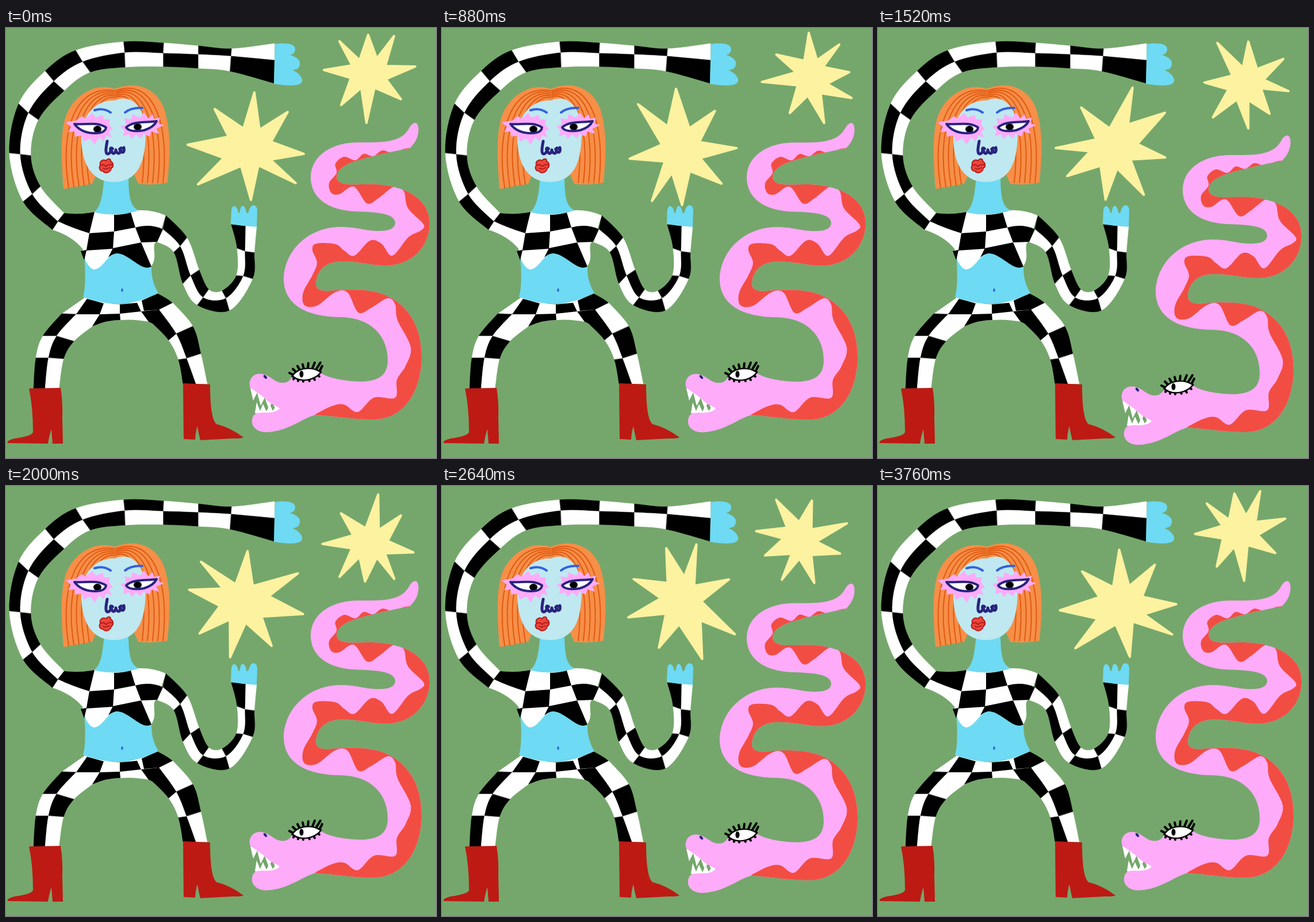
Write an HTML page with a canvas that moves like this. It is 748 px wide and 748 px high and loops after 3.84 s.

```html
<!DOCTYPE html>
<html lang="en">
<head>
<meta charset="utf-8">
<title>Dancer, stars and snake</title>
<style>
html, body { margin: 0; width: 100%; height: 100%; overflow: hidden; background: #75a76c; }
canvas { display: block; }
</style>
</head>
<body>
<canvas id="stage" width="748" height="748"></canvas>
<script>
const ctx = document.getElementById('stage').getContext('2d');
const FRAME = 80, FRAMES = 48, BOUNCE = 12;
const GREEN = '#75a76c', STAR = '#fcf2a0', SKY = '#6edaf3', FACE = '#bfe8f0', PINK = '#feabf9',
  RED = '#f24d43', BOOT = '#bd1a14', NAVY = '#29237f', HAIR = '#f68f48', STREAK = '#e25a12';

const fill = (d, color) => { ctx.fillStyle = color; ctx.fill(new Path2D(d)); };
const line = (d, color, width) => {
  ctx.strokeStyle = color;
  ctx.lineWidth = width;
  ctx.stroke(new Path2D(d));
};
const dot = (x, y, rx, ry, color, tilt = 0) => {
  ctx.fillStyle = color;
  ctx.beginPath();
  ctx.ellipse(x, y, rx, ry, tilt, 0, 7);
  ctx.fill();
};
const pairs = list => list.reduce((out, v, i) => (i % 2 ? out[out.length - 1].push(v) : out.push([v]), out), []);

// Controls of the smooth segment from point i to i + 1.
function segment(pts, i) {
  const b = pts[i], c = pts[i + 1], a = pts[i - 1] || b, d = pts[i + 2] || c;
  return [b, b.map((v, k) => v + (c[k] - a[k]) / 6), c.map((v, k) => v - (d[k] - b[k]) / 6), c];
}
const curve = s => 'C' + s.slice(1).join(' ');
const spline = pts => 'M' + pts[0] + pts.slice(1).map((_, i) => curve(segment(pts, i))).join('');

// Two rows of checks; each section holds outer, middle and inner point.
function ribbon(sections, first) {
  const edges = [0, 2, 4].map(k => sections.map(s => s.slice(k, k + 2)));
  for (let i = 0; i < sections.length - 1; i++) {
    for (let row = 0; row < 2; row++) {
      const a = segment(edges[row], i), b = segment(edges[row + 1], i).reverse();
      const color = (i + row + first) % 2 ? '#000' : '#fff';
      const d = `M${a[0]}${curve(a)}L${b[0]}${curve(b)}Z`;
      fill(d, color);
      line(d, color, .5);
    }
  }
}

const raisedArm = [
  [467, 27, 467, 56, 466, 96], [392, 36, 391, 49, 389, 75], [334, 31, 334, 46, 334, 70],
  [274, 26, 273, 44, 273, 67], [204, 24, 206, 43, 207, 68], [121, 39, 133, 59, 146, 77],
  [68, 75, 83, 93, 101, 109], [22, 132, 39, 148, 56, 160], [6, 218, 25, 220, 43, 222],
  [30, 302, 46, 289, 60, 276], [81, 351, 90, 336, 101, 322]];
const lowArm = [
  [278, 326, 273, 350, 263, 372], [315, 365, 303, 380, 292, 390], [336, 421, 321, 431, 308, 445],
  [353, 455, 343, 469, 333, 482], [376, 457, 383, 470, 389, 491], [401, 430, 413, 431, 429, 436],
  [402, 383, 416, 388, 432, 390], [392, 342, 417, 344, 436, 345]];
const leftLeg = [
  [97, 497, 122, 498, 150, 519], [64, 536, 88, 536, 118, 545],
  [52, 574, 74, 574, 100, 576], [48, 628, 68, 628, 92, 628]];
const rightLeg = [
  [290, 478, 266, 490, 253, 512], [325, 519, 296, 532, 283, 543],
  [339, 567, 314, 575, 300, 577], [350, 619, 330, 619, 308, 619]];

function drawLimbs() {
  ribbon(raisedArm, 0);
  ribbon(lowArm, 1);
  fill('M468 28C485 25 503 27 503 36C503 43 500 45 494 47C506 50 513 57 511 64C510 71 504 73 498 73C508 77 517 86 515 93C512 102 490 101 466 97Z', SKY);
  fill('M391 341L392 318C393 306 402 308 404 321Q406 324 407 318C409 305 416 308 418 320Q420 326 423 317C426 304 438 306 437 319L436 346Q413 345 391 341Z', SKY);

  fill('M136 395C139 430 138 455 134 468Q200 495 265 461C255 445 251 425 254 405L200 380Z', SKY);
  dot(202, 456, 1.7, 3, '#3461dc');
  fill('M137 469Q165 479 200 481Q235 476 264 462L290 478L253 512Q225 506 200 508Q170 509 150 519L97 497Z', '#fff');
  ribbon(leftLeg, 1);
  ribbon(rightLeg, 0);
  fill('M141 471L170 479L163 498L122 498ZM163 498L198 497L199 508Q175 508 150 519ZM198 481L228 478L235 493L198 497Z', '#000');
  fill('M236 474L264 462Q280 470 290 478L266 490L240 492ZM235 493L266 490L296 532L283 543Q268 518 248 511Z', '#000');

  fill('M40 627L95 626Q99 650 98 680L99 723L81 723L79 698Q76 705 73 723L3 722Q0 718 15 714Q45 710 47 703Q47 660 40 627Z', BOOT);
  fill('M308 618L355 620Q355 680 366 689Q390 695 413 712Q412 714 395 714L338 717Q335 705 333 693Q330 700 329 716L309 715Z', BOOT);
}

function drawTorso() {
  fill('M101 322Q130 325 154 320Q192 330 231 317Q255 316 278 326L263 372Q256 371 258 390Q260 405 252 416C236 424 215 393 193 392C176 393 168 421 152 420Q138 414 133 384Q115 362 81 351Z', '#fff');
  fill('M101 322Q130 325 154 320L145 357Q115 348 90 336Z', '#000');
  fill('M188 325Q203 325 217 321L225 347L188 354Z', '#000');
  fill('M145 357L188 354L186 384L140 387L136 404L130 388L140 386Z', '#000');
  fill('M225 347Q250 340 273 350L263 372L235 373Z', '#000');
  fill('M186 383L235 373L253 415C236 425 215 393 193 392Q185 393 178 399Z', '#000');
}

function drawHead() {
  fill('M171 255C169 285 166 312 153 320Q192 330 231 317C217 312 213 295 213 255Z', SKY);
  fill('M100 280C97 240 94 195 101 165C108 125 150 92 189 106C228 90 262 106 275 140C288 180 285 225 281 269Q257 274 230 271L190 180L150 271Z', HAIR);
  for (let i = 0; i < 5; i++) {
    const y = 109 + 3 * i, in9 = 9 * i;
    line(`M189 ${y}C${125 + in9} ${98 + 4 * i} ${92 + in9} 170 ${109 + in9} ${278 - i * 1.6}`, STREAK, 2);
    line(`M191 ${y}C${255 - in9} ${85 + 5 * i} ${285 - in9} 165 ${273 - in9} 269`, STREAK, 2);
  }
  fill('M190 126C222 112 245 145 243 185C242 220 237 268 187 268C142 267 131 225 131 190C131 150 158 124 190 126Z', FACE);
  line('M154 143Q169 138 182 147M207 147Q217 138 237 139', '#3461dc', 4);

  fill('M104 164L122 161L132 153L138 158L150 148L156 156L168 151L171 159L181 159L179 168L186 176L179 180L184 190L174 187L170 197L162 190L154 203L147 192L135 198L132 187L120 189L119 180L108 181L113 172Z', PINK);
  fill('M275 169L265 166L268 156L258 158L255 150L247 157L240 147L233 156L220 150L218 159L206 157L209 168L199 171L206 178L204 188L214 185L219 193L226 185L235 192L239 184L250 189L253 180L266 184L262 175Z', PINK);
  const eyes = ['M119 167C137 169 158 162 174 173C173 181 164 183 155 183C142 183 128 179 119 167Z',
    'M262 162C245 165 222 161 209 173C213 180 227 180 240 178C250 175 258 170 262 162Z'];
  eyes.forEach((d, i) => {
    fill(d, '#fff');
    ctx.save();
    ctx.clip(new Path2D(d));
    dot(i ? 229 : 159, i ? 172 : 176, 7, 6, '#000');
    ctx.restore();
    line(d, NAVY, 4);
  });
  line('M176 197C174 208 172 219 177 219C181 219 182 214 183 211C184 220 190 221 191 212C193 220 199 220 199 212C201 219 207 217 205 208', NAVY, 5);
  line('M181 211Q182 206 186 210M197 211Q200 206 203 210', NAVY, 4);
  const lips = 'M164 239C162 232 169 227 174 231C177 226 183 227 182 232C188 235 187 242 183 244C182 252 172 254 169 249C163 249 161 243 164 239Z';
  fill(lips, '#ea463b');
  line(lips, '#b51d1c', 2);
  line('M165 239Q170 236 174 241Q179 236 184 238M169 244Q174 247 180 243', '#b51d1c', 2);
}

const body = 'M711 165C718 164 719 178 716 188C713 198 707 204 703 209C670 215 625 225 598 235C575 245 571 259 579 267C588 274 602 272 622 272' +
  'C680 269 737 290 737 340C736 383 704 413 660 413C634 413 615 406 585 406C553 406 540 424 539 445C539 456 552 459 566 457' +
  'C602 454 638 454 665 467C704 486 724 525 723 577C720 640 688 680 640 681C600 681 572 675 538 673C517 678 492 701 455 703C434 704 423 690 430 675' +
  'Q433 668 450 669Q470 670 477 661Q460 655 448 642Q436 633 425 626C420 610 432 599 446 602C460 604 468 618 482 617C493 617 496 609 501 603' +
  'C512 589 535 591 548 600C560 609 590 615 622 615C650 613 664 603 664 578C664 535 635 505 585 503C520 503 483 480 483 436C485 385 528 346 582 346' +
  'C610 346 625 353 648 353C665 353 677 350 677 338C675 322 645 320 605 319C560 316 530 296 530 259C531 218 573 198 615 199C670 200 690 195 702 173Q706 166 711 165Z';
const wave = pairs([
  706, 208, 690, 211, 676, 219, 655, 213, 639, 223, 622, 219, 608, 230, 588, 224, 573, 236, 575, 252,
  562, 270, 566, 287, 580, 289, 605, 276, 628, 305, 648, 296, 675, 276, 692, 284, 699, 313, 726, 341,
  722, 352, 700, 364, 672, 396, 653, 375, 633, 370, 606, 396, 588, 387, 573, 376, 540, 375, 533, 386,
  541, 408, 533, 430, 517, 460, 519, 482, 541, 483, 572, 460, 594, 460, 613, 495, 635, 487, 664, 470,
  677, 481, 681, 508, 704, 555, 695, 588, 680, 612, 677, 643, 640, 643, 612, 668, 588, 655, 566, 658, 538, 672]);
const scales = spline(wave) + 'L538 720L748 720L748 208Z';
const lashes = 'M501 604L493 600M505 599L499 593M511 595L507 588M518 593L516 585M525 592L526 583M533 592L537 582M540 593L547 582M546 596L550 588' +
  'M502 606L500 611M509 609L508 614M517 611L517 615M526 610L528 614M534 607L537 612M541 603L545 606';

function drawSnake(drop) {
  ctx.save();
  ctx.translate(0, drop);
  fill('M425 626L430 648L437 634L443 657L450 643L457 662L463 651L469 663L476 660Q455 645 440 633Z', '#fff');
  fill('M433 670L436 651L442 666L447 654L453 667L459 655L464 666L470 657L477 662Q465 672 450 671Z', '#fff');
  fill(body, PINK);
  ctx.save();
  ctx.clip(new Path2D(body));
  fill(scales, RED);
  ctx.restore();
  line(lashes, '#000', 4);
  fill('M496 606C505 590 530 586 550 598C539 615 510 619 496 606Z', '#000');
  fill('M500 605C508 593 530 589 546 599C536 612 512 616 500 605Z', '#fff');
  dot(514, 602, 3.5, 6, '#000');
  dot(451, 607, 2.2, 4, NAVY, -.7);
  ctx.restore();
}

const stars = [
  { x: 417, y: 206.3, pts: pairs([432, 112, 441, 177, 490, 146, 461, 198, 518, 219, 460, 229, 504, 270, 439, 239,
    426, 299, 409, 240, 334, 272, 379, 226, 316, 203, 387, 189, 363, 141, 413, 175]) },
  { x: 632.3, y: 89.2, pts: pairs([630, 12, 645, 53, 675, 14, 660, 66, 712, 67, 661, 89, 687, 124, 641, 104,
    627, 165, 618, 104, 583, 134, 600, 87, 553, 73, 602, 65, 580, 23, 615, 56]) }];

function drawStar({ x, y, pts }, angle) {
  const d = 'M' + pts.join('L') + 'Z';
  ctx.save();
  ctx.translate(x, y);
  ctx.rotate(angle);
  ctx.translate(-x, -y);
  fill(d, STAR);
  line(d, STAR, 4);
  ctx.restore();
}

function draw(now) {
  const step = Math.floor(now / FRAME) % FRAMES;
  const phase = 1 - Math.abs(step % BOUNCE * 2 / BOUNCE - 1);
  ctx.lineJoin = ctx.lineCap = 'round';
  ctx.fillStyle = GREEN;
  ctx.fillRect(0, 0, 748, 748);
  drawLimbs();
  drawTorso();
  drawHead();
  drawSnake(38 * phase ** 3);
  stars.forEach(star => drawStar(star, step / FRAMES * 2 * Math.PI));
  requestAnimationFrame(draw);
}
requestAnimationFrame(draw);
</script>
</body>
</html>
```
